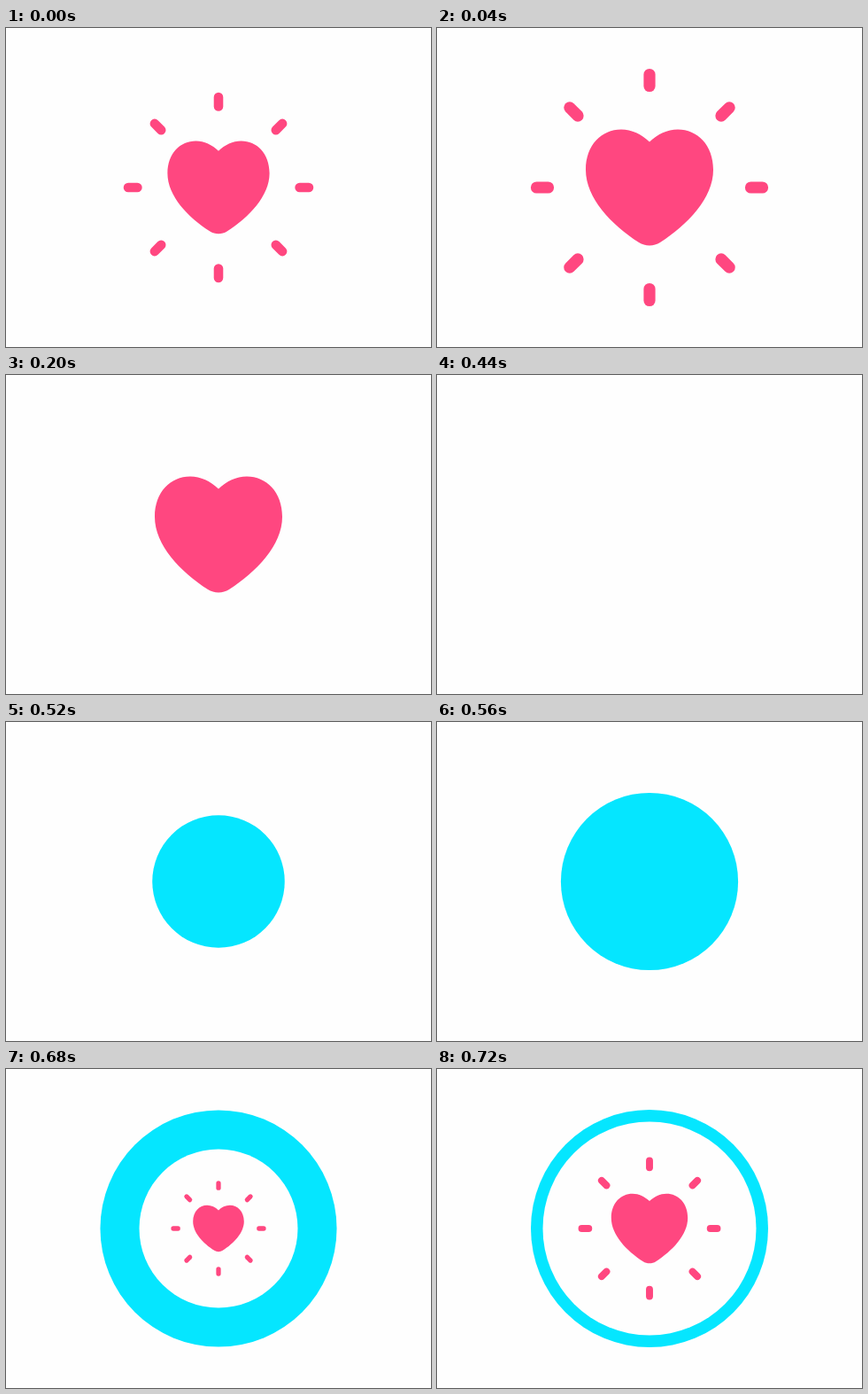
Recreate the animation shown at these times as an HTML page with a canvas. Size 480x360 px, loop 0.76 s.

```html
<!DOCTYPE html>
<html lang="en">
<head>
<meta charset="utf-8">
<title>Heart burst</title>
<style>
  html, body { margin: 0; width: 100%; height: 100%; overflow: hidden; background: #fefefe; }
  canvas { display: block; }
</style>
</head>
<body>
<canvas id="stage" width="480" height="360"></canvas>
<script>
const ctx = document.getElementById('stage').getContext('2d');
const LOOP = 760, STEP = 40;
const PINK = '#ff4780', CYAN = '#05e6ff', PAPER = '#fefefe';
const RING_RADIUS = 134, RAY_WIDTH = 13.2;

const heart = new Path2D(
  'M0-51.5C-9-60-20-65.5-32-65.5C-54-65.5-72-48-72-20' +
  'C-72 12-43 42-12 62C-5 66.5 5 66.5 12 62' +
  'C43 42 72 12 72-20C72-48 54-65.5 32-65.5C20-65.5 9-60 0-51.5Z');

const clamp = (v, lo = 0, hi = 1) => Math.min(hi, Math.max(lo, v));
const progress = (t, from, to) => clamp((t - from) / (to - from));
const mix = (a, b, u) => a + (b - a) * u;

function disc(radius, color) {
  ctx.fillStyle = color;
  ctx.beginPath();
  ctx.arc(0, 0, radius, 0, 2 * Math.PI);
  ctx.fill();
}

function drawRing(t) {
  const u = progress(t, 440, 700);
  disc(RING_RADIUS * (1 - (1 - u) ** 2.22), CYAN);
  disc(Math.max(0, 27.5 + (t - 600) * 0.775), PAPER);
}

function drawRays(inner, outer, width) {
  ctx.strokeStyle = PINK;
  ctx.lineCap = 'round';
  ctx.lineWidth = width;
  for (let i = 0; i < 8; i++) {
    const x = Math.cos(i * Math.PI / 4), y = Math.sin(i * Math.PI / 4);
    ctx.beginPath();
    ctx.moveTo(x * inner, y * inner);
    ctx.lineTo(x * outer, y * outer);
    ctx.stroke();
  }
}

// Heart and rays pop up together from 600 ms, across the loop seam.
function drawBurst(t) {
  const age = t < 440 ? t + LOOP : t;
  const scale = progress(age, 600, 800);
  if (!scale) return;
  ctx.scale(scale, scale);
  ctx.fillStyle = PINK;
  ctx.fill(heart);

  const flight = progress(age, 800, 880);
  const width = RAY_WIDTH * (1 - progress(age, 880, 960));
  if (width) drawRays(mix(114.5, 165, flight), mix(127.5, 165.01, flight), width);
}

function draw(t) {
  ctx.setTransform(1, 0, 0, 1, 0, 0);
  ctx.fillStyle = PAPER;
  ctx.fillRect(0, 0, 480, 360);
  ctx.translate(240, 180);
  if (t >= 440) drawRing(t);
  drawBurst(t);
}

let start;
function tick(now) {
  start ??= now;
  const t = (now - start + 0.01) % LOOP;
  draw(Math.floor(t / STEP) * STEP);
  requestAnimationFrame(tick);
}
draw(0);
requestAnimationFrame(tick);
</script>
</body>
</html>
```
